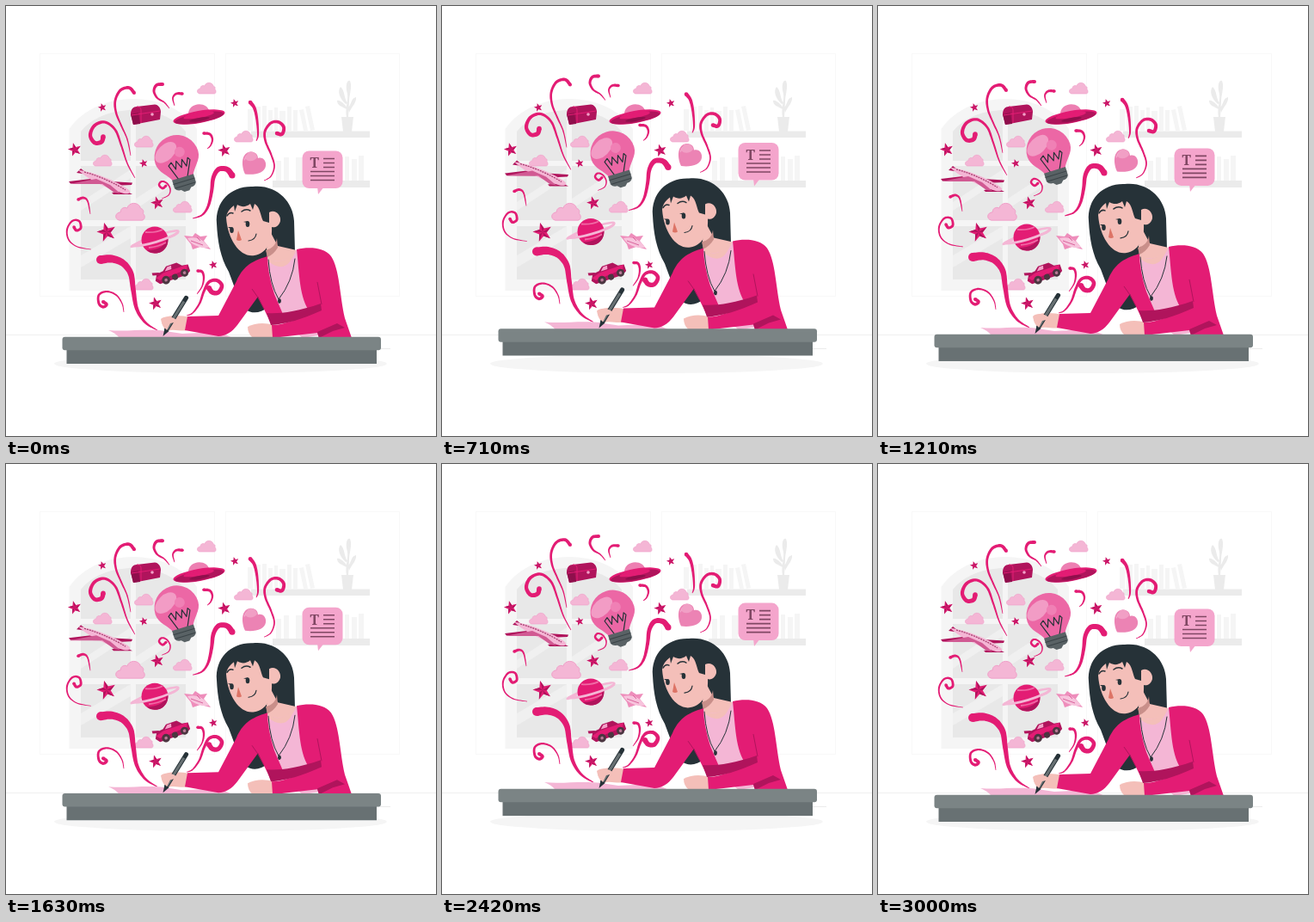
An HTML page for the animation above (3040 ms loop, 500 by 500 pixels).

```html
<!DOCTYPE html>
<html lang="en">
<head>
<meta charset="utf-8">
<title>Writing ideas</title>
<style>
html, body { margin: 0; width: 100%; height: 100%; overflow: hidden; background: #fff; }
svg { display: block; width: 100vw; height: 100vh; }
.p { fill: #e31c74; } .d { fill: #b0145c; } .l { fill: #f4b6d5; }
.h { fill: #263238; } .s { fill: #f4bfb9; } .g { fill: #ebebeb; } .w { fill: #f5f5f5; }
.line { fill: none; stroke: #263238; stroke-linecap: round; stroke-linejoin: round; }
</style>
</head>
<body>
<svg viewBox="0 0 500 500">
  <defs>
    <path id="cloud" d="M3 13C-1 12 0 7 4 7C4 3 8 3 9 4C10-1 18-1 19 4C22 5 21 7 21 8C23 10 22 13 20 13Z"
      fill="#f4b6d5" stroke="#ef9cc6" stroke-width=".6"/>
    <g id="star">
      <path class="p" d="M0-10L2.4-3.4L9.5-3.1L3.9 1.3L5.9 8.1L0 4.1L-5.9 8.1L-3.9 1.3L-9.5-3.1L-2.4-3.4Z"/>
      <path class="d" d="M0 0V-10L2.4-3.4ZM0 0L9.5-3.1L3.9 1.3ZM0 0L5.9 8.1L0 4.1ZM0 0L-5.9 8.1L-3.9 1.3ZM0 0L-9.5-3.1L-2.4-3.4Z"/>
    </g>
  </defs>

  <!-- room -->
  <g fill="none" stroke="#f8f8f8">
    <rect x="39.5" y="55.500" width="203" height="282"/>
    <rect x="255.500" y="55.500" width="202" height="282"/>
    <path stroke="#f0f0f0" d="M0 382.500H500"/><path stroke="#ebebeb" d="M431 398.500H447"/>
  </g>
  <path class="w" d="M73.500 331V143C90 119 120 108 148 108S206 119 222 143V331Z"/>
  <g fill="#e8e8e8">
    <path d="M87 180V146C101 129 122 122 145 121V180ZM151 180V121C174 122 195 129 209 146V180Z"/>
    <path d="M87 186H145V249H87ZM151 186H209V249H151ZM87 256H145V318H87ZM151 256H209V318H151Z"/>
  </g>
  <path fill="#f0f0f0" d="M87 290L145 256V270L87 304ZM87 228L145 190V200L87 238ZM151 224L209 186V198L151 236Z"/>
  <path class="g" d="M285 145.500H423V153H285ZM310 203H423V211H310Z"/>
  <g class="w">
    <path d="M281 120H287V145H281ZM289 117H296V145H289ZM298 116H303V145H298ZM305 121H310V145H305ZM312 118H316V145H312ZM318 122H325V145H318ZM327 117H332V145H327ZM334 121H339V145H334ZM341 121L346 120L351 145H346ZM348 117L353 116L359 144L354 145Z"/>
    <path d="M314 180H320V203H314ZM323 176H329V203H323ZM337 176H344V203H337ZM394 175H399V203H394ZM402 178H408V203H402ZM410 174H416V203H410Z"/>
  </g>
  <g class="g">
    <path d="M390 129H404L402 146H392Z"/>
    <path d="M396 130C394 118 398 112 397 102C394 92 397 85 400 87C403 94 399 103 399 112L398 130ZM396 120C391 117 385 116 385 110C388 109 394 114 397 119ZM395 114C388 108 385 99 389 94C394 98 393 107 397 113ZM398 118C402 114 401 107 407 106C408 112 402 117 399 124Z"/>
  </g>
  <ellipse cx="249.500" cy="416" rx="193.500" ry="11" class="w"/>

  <g id="sky"></g>
  <!-- chest -->
  <path class="d" d="M145 126C145 120 148 117 152 117L173 114.500C177 114.500 180 119 180 123L179 132L148 138Z"/>
  <path fill="#8f0f4c" d="M145 126L154 124L156 137L148 138Z"/>
  <path fill="none" stroke="#e31c74" d="M146 127L179 122M157 136V121C157 118 155 117 152 117"/>
  <circle cx="170" cy="126" r="1.800" fill="#f4a0c8"/>
  <!-- saucer -->
  <g transform="translate(224.500 129) rotate(-10)">
    <path fill="#ed7fb2" d="M-12-3C-12-19 13-18 13-3Z"/>
    <ellipse rx="30.500" ry="7" class="p"/><ellipse cy="1" rx="29" ry="5.500" class="d"/>
    <ellipse cy="-2" rx="18" ry="3" class="p"/><ellipse cy="3" rx="12" ry="2" fill="#8f0f4c"/>
  </g>
  <!-- car -->
  <g transform="translate(193 311) rotate(-19)">
    <path class="d" d="M-21 2L-17-5L-9-6L-4-10H9L14-5L21-4V4L16 7H-17Z"/>
    <path class="p" d="M-19-1L-9-4H20L18 1L-16 3Z"/><path fill="#f4a0c8" d="M-3-9H2L1-5H-7Z"/>
    <path class="d" d="M-22-8L-14-6L-15-3L-22-5Z"/>
    <g fill="#4b3540"><circle cx="-9" cy="5" r="4.800"/><circle cx="2" cy="5" r="3.500"/><circle cx="14" cy="4" r="4.500"/></g>
    <g fill="#b87996"><circle cx="-9" cy="5" r="1.800"/><circle cx="14" cy="4" r="1.800"/></g>
  </g>
  <!-- rocket -->
  <path fill="#ee8dbb" d="M207 267L217 268L220 264L226 268L234 267L230 273L238 283L226 280L217 283L215 277Z"/>
  <path fill="#f7c3dc" d="M211 270C220 267 232 272 236 281C226 282 215 278 211 270Z"/>
  <path fill="none" stroke="#d9649c" d="M215 273L229 278M222 269L226 273"/>

  <g class="fast">
    <g id="swirls" class="p"></g>
    <!-- plane -->
    <path class="d" d="M73 204L107 200L122 207L75 206.500ZM82 194L87 189L96 196ZM122 204L147 205.500L146 208L124 209ZM123 217L139 215L147 219L125 219Z"/>
    <path class="l" d="M84 191C100 192 130 204 143 214C146 217 143 219 137 218C119 213 96 202 84 191Z"/>
    <path fill="none" stroke="#a83f70" stroke-width="1.300" stroke-dasharray="2 1" d="M91 193C110 198 128 207 139 214"/>
    <path fill="#d15a93" d="M105 201L121 208L133 218L126 217L112 207L74 207L94 203Z"/>
    <!-- planet -->
    <path fill="none" stroke="#f4b6d5" stroke-width="2.500" d="M157 275C144 281 144 281 148 278C165 268 205 257 200 263C198 266 193 268 188 269"/>
    <circle cx="173" cy="272" r="15.500" class="p"/>
    <path class="d" d="M164 284C177 284 186 279 188 268C190 279 183 288 173 287.500Q167 287 164 284Z"/>
    <path fill="none" stroke="#f06aa5" stroke-width="1.800" d="M162 263Q174 264 182 260M166 281Q177 280 186 275"/>
    <path fill="none" stroke="#f4b6d5" stroke-width="2.800" d="M146.500 279C160 280 190 271 200.500 263"/>
    <!-- heart -->
    <path fill="#ec83b4" d="M278 195.500C273 184 274 171 284 169.500C290 169 293 173 293 177C299 175 303 181 302 186C301 194 290 197 278 195.500Z"/>
    <path class="l" d="M277 180C277 173 283 170 287 172C283 174 279 176 277 180Z"/>
    <path fill="#f19fc5" d="M281 171C285 168 291 170 292 176C288 182 280 181 278 177Z"/>
    <!-- note -->
    <rect x="344.500" y="168.500" width="47" height="43.500" rx="8" fill="#f4a5cc"/>
    <path fill="#f4a5cc" d="M362 210H370L363 219Z"/>
    <text x="353.500" y="188.300" fill="#804763" font-family="Noto Serif, Liberation Serif, serif" font-weight="700" font-size="16">T</text>
    <path stroke="#804763" stroke-width="1.700" d="M369 177.500H382M369 182.500H382M369 187.500H382M354 192.500H382M354 197.500H382M354 202.500H382"/>
  </g>

  <!-- bulb -->
  <g class="slow">
    <g transform="translate(198.500 176) rotate(-17)">
      <path fill="#ec67a5" d="M-26 0A26 26 0 1 1 26 0C26 11 15 17 12 26H-12C-15 17-26 11-26 0Z"/>
      <ellipse cx="-5" cy="-13" rx="15" ry="9" transform="rotate(-28)" fill="#f29cc5"/>
      <circle cx="5" cy="-5" r="6" fill="#f080b5"/>
      <path class="line" stroke-width="1.200" d="M-5 26L-12 7L-8 4L-5 13L-2 4L2 13L5 4L8 13L12 4L14 7L5 26"/>
      <path fill="#596265" d="M-13 24H13V34Q11 38 6 38L3 41H-3L-6 38Q-11 38-13 34Z"/>
      <path stroke="#3a4347" d="M-13 29H13M-12 34H12"/>
    </g>
  </g>

  <g class="fast">
    <!-- hair -->
    <path class="h" d="M245 253C243 227 262 209 287 210C314 207 334 227 335 250L336 286C326 291 318 288 314 284L305 350C292 361 277 357 272 344L259 309C249 292 246 273 245 253Z"/>
    <!-- neck and face -->
    <path class="s" d="M306 260L316 279L338 284L327 315L304 296L303 282Z"/>
    <path fill="#c98f8a" d="M302 284C310 282 314 277 315 270L316 281Q311 289 304 292Z"/>
    <path class="s" d="M256 246C257 239 261 235 265 232L266 239L269 231C274 234 279 234 284 230L287 237L289 230C296 234 296 245 299 250L306 252V240C313 236 320 243 319 250C317 257 312 258 309 257C310 275 302 288 289 290C273 293 258 273 256 246Z"/>
    <path class="line" stroke-width="1.500" d="M257 244Q260 239 264 241M274 239Q279 235 284 238"/>
    <ellipse cx="262.500" cy="260.500" rx="2.300" ry="3.500" class="h"/>
    <ellipse cx="281" cy="253.500" rx="2.300" ry="3.500" class="h"/>
    <path class="h" d="M258 257L262 257L261 259ZM276 251L281 250L280 252Z"/>
    <path fill="#dd7466" d="M270 261L274 272Q271 274 268 272Z"/>
    <path class="line" stroke-width="1.200" d="M282 273Q290 272 291 265"/>
    <!-- blouse -->
    <path class="l" d="M304 293C316 301 330 295 337 284L342 283L354 357L370 382L345 386L318 364L303 305Z"/>
    <path class="s" d="M305 292Q318 305 338 284L331 296Q322 310 305 297Z"/>
    <path class="line" stroke-width="1" d="M305 295Q307 324 317 341Q333 321 336 294"/>
    <ellipse cx="318" cy="343" rx="1.900" ry="2.800" class="h"/>
    <!-- hands and pen -->
    <path class="l" d="M119 377C141 379 164 375 185 378L205 381L247 379L264 386H132Q127 380 119 377Z"/>
    <path class="s" d="M181 365C189 358 203 360 215 362L211 377C202 379 194 374 186 379C185 374 180 371 181 365Z"/>
    <path stroke="#263238" stroke-width="5.200" stroke-linecap="round" d="M209.500 339.500L187 376"/>
    <path stroke="#687173" stroke-width="3.200" d="M207 343.500L187 376"/>
    <path class="h" d="M184.500 375L189.500 378L182.500 384Z"/>
    <path class="s" d="M180 364C185 359 196 361 200 367L191 369L187 377Q181 371 180 364Z"/>
    <path class="s" d="M281 373C290 368 302 368 311 371V386H287Q281 381 281 373Z"/>
    <!-- jacket -->
    <path class="p" d="M304 291C284 297 275 304 268 320L247 360L211 361L208 377L247 384C255 384 263 379 269 371L293 338L308 369L324 363L312 335Q304 310 304 291Z"/>
    <path class="p" d="M338 283C351 280 370 280 378 291C388 306 388 337 394 363L402 386H364L362 380L310 386L309 371C324 371 342 363 354 356C341 342 341 309 338 283Z"/>
    <path class="d" d="M303 357C318 358 337 356 366 346L367 354C345 364 325 370 308 371ZM364 386L362 379L385 369L394 374L380 378Z"/>
    <path fill="none" stroke="#b0145c" d="M362 321L367 347M286 329L293 339L300 352"/>
    <!-- desk -->
    <rect x="70.500" y="398" width="360.500" height="18" fill="#687173"/>
    <rect x="65.500" y="384.700" width="370.500" height="15.500" rx="3" fill="#7b8485"/>
  </g>
</svg>
<script>
const $ = q => document.querySelector(q);
const mid = (a, b) => Math.hypot(b[0] - a[0], b[1] - a[1]) || 1;

// A smooth stroke through the points that thins from head to tail.
function swirl(width, text) {
  const pts = text.split(' ').map(s => s.split(',').map(Number));
  const at = i => pts[Math.max(0, Math.min(pts.length - 1, i))];
  const path = [], n = 8;
  for (let k = 0; k <= (pts.length - 1) * n; k++) {
    const i = Math.floor(k / n), f = k % n / n;
    const [a, b, c, d] = [at(i - 1), at(i), at(i + 1), at(i + 2)];
    path.push([0, 1].map(j => b[j] + f / 2 * (c[j] - a[j] +
      f * (2 * a[j] - 5 * b[j] + 4 * c[j] - d[j] + f * (3 * (b[j] - c[j]) + d[j] - a[j])))));
  }
  const last = path.length - 1, left = [], right = [];
  path.forEach(([x, y], k) => {
    const a = path[Math.max(0, k - 1)], b = path[Math.min(last, k + 1)], len = mid(a, b);
    const r = .3 + (width / 2 - .3) * (1 - k / last) ** .75;
    const nx = (a[1] - b[1]) / len * r, ny = (b[0] - a[0]) / len * r;
    left.push([x + nx, y + ny]);
    right.unshift([x - nx, y - ny]);
  });
  const [x, y] = path[0];
  return `<path d="M${left.concat(right).map(p => p.map(v => v.toFixed(1))).join('L')}Z"/>` +
    `<circle cx="${x}" cy="${y}" r="${width / 2}"/>`;
}

$('#swirls').innerHTML = [
  [4, '149,101 143,95 133,98 127,110 128,124 134,139 141,155 145,174'],
  [5.5, '113,152 111,158 103,159 98,150 103,139 115,135 127,144 134,162 141,183 150,200'],
  [4, '182,91 175,92 172,99 176,107 184,112 190,119'],
  [3.5, '205,102 198,102 194,107 196,116'],
  [4.5, '284,112 289,119 292,133 293,150 291,157'],
  [4.5, '315,148 321,149 323,141 317,135 308,136 301,146 302,158 308,172 312,186 308,198 300,203'],
  [3.5, '230,148 237,149 240,155 238,162 234,166'],
  [7, '263,197 257,190 247,190 241,200 239,216 235,233 228,243 217,247'],
  [3, '186,209 182,212 178,208 181,204 187,206 191,213 189,220 181,224'],
  [3.5, '84,225 90,223 95,227 98,242'],
  [3.5, '79,257 82,261 87,258 85,250 77,250 71,260 73,272 83,280 99,283'],
  [10, '110,295 123,294 136,299 145,311 148,330 152,352 162,368 176,377'],
  [4, '113,344 117,347 113,350 108,346 108,336 117,332 128,336 135,346 137,356'],
  [6, '236,328 240,333 247,333 251,325 245,319 236,321 230,332 225,346 217,357 210,360'],
  [3.5, '223,308 228,309 230,316 228,326 222,335']
].map(s => swirl(...s)).join('');

const clouds = [[222, 89, 1], [149, 151, 1], [101, 173, 1], [127, 229, 1.55], [194, 227, 1], [265, 145, 1], [149, 317, 1]];
const stars = [[80, 167, .8], [112, 118, .5], [160, 183, .5], [176, 229, .78], [117, 263, 1.15],
  [254, 168, .75], [266, 113, .5], [241, 301, .5], [174, 346, .78]];
const place = (id, turn) => ([x, y, s]) => `<use href="#${id}" transform="translate(${x} ${y}) rotate(${turn}) scale(${s})"/>`;
$('#sky').innerHTML = clouds.map(place('cloud', 0)).join('') + stars.map(place('star', -15)).join('');

// Steady rise and fall by ten pixels.
const LOOP = 3040, LEAD = 30;
const rise = (t, period) => 10 - 20 * Math.abs(t / period % 1 - .5);
const fast = document.querySelectorAll('.fast'), slow = $('.slow');
const shift = (el, y) => el.setAttribute('transform', `translate(0 ${y})`);

function draw(now) {
  const t = now % LOOP + LEAD;
  fast.forEach(el => shift(el, .4 - rise(t, 1500)));
  shift(slow, .2 - rise(t, 3000));
  requestAnimationFrame(draw);
}
draw(performance.now());
</script>
</body>
</html>
```
